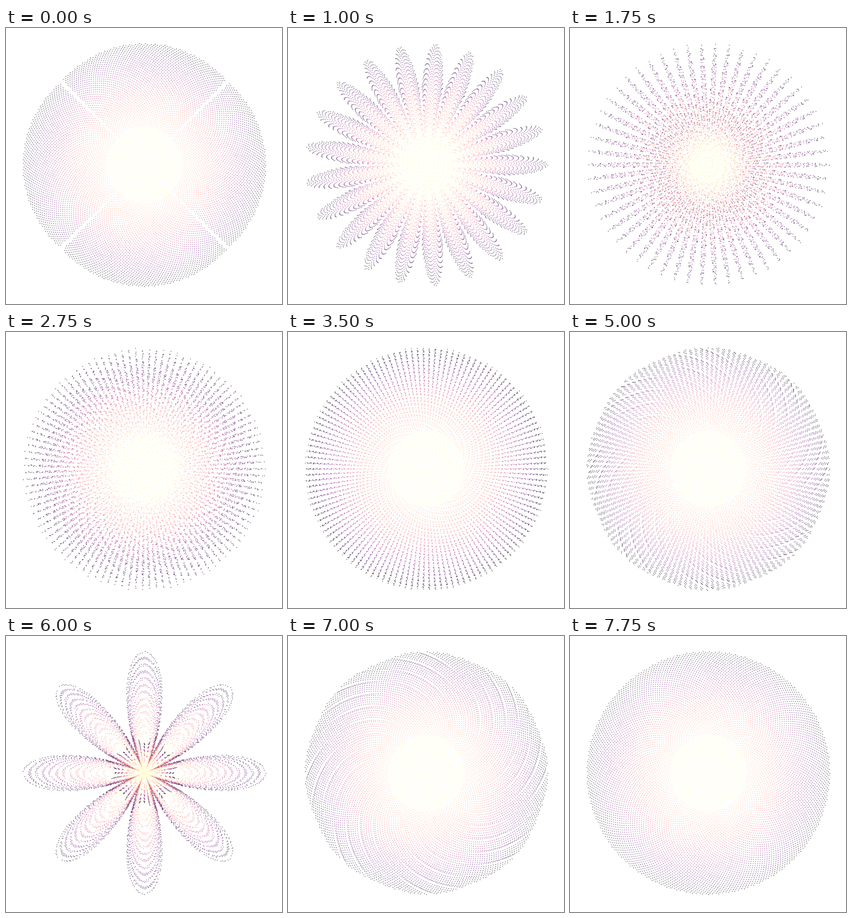
Write an HTML page with a canvas that moves like this. It is 480 px wide and 480 px high and loops after 8000 ms.

```html
<!DOCTYPE html>
<html lang="en">
<head>
<meta charset="utf-8">
<title>Phyllotaxis</title>
<style>
  html, body { margin: 0; width: 100%; height: 100%; overflow: hidden; background: #fff; }
  canvas { display: block; }
</style>
</head>
<body>
<canvas id="stage" width="480" height="480"></canvas>
<script>
const ctx = document.getElementById('stage').getContext('2d');
const COUNT = 10000, RADIUS = 211.5, CX = 240.7, CY = 238.2;
const STEP = 250, STEPS = 32;
const TURN = 2 * Math.PI, GOLDEN = Math.PI * (3 - Math.sqrt(5));
const PETALS = 8, SPIKES = 40, RING = RADIUS / 18;

const mix = (a, b, t) => a + (b - a) * t;
const snap = (value, unit) => Math.round(value / unit) * unit;
const bump = (x, center, width) => Math.exp(-(((x - center) / width) ** 2));

// Pale yellow through orange, pink and purple to black
function colorAt(u) {
  const r = 255 * Math.min(1, 1.43 * (1 - u));
  const g = 253 * (1 - u) ** 2;
  const b = 125 * Math.min(1, 4 * (1 - u)) + 66 * Math.max(0, 1 - 4 * u);
  return `rgb(${[r, g, b].map(Math.round)})`;
}

// Outermost first, so that the pale core lies on top
const points = Array.from({ length: COUNT }, (_, n) => {
  const i = COUNT - 1 - n, u = (i + 0.5) / COUNT, pale = u < 0.1;
  return {
    angle: i * GOLDEN,
    radius: RADIUS * Math.sqrt(u),
    color: colorAt(pale ? 0 : u),
    alpha: pale ? 0.3 : 0.6,
    size: pale ? 1.2 : 0.8,
    floret: i % 6 === 0
  };
});

// The sunflower gathers into ever more rays, then opens as a flower
function shapeAt(step) {
  return {
    rays: Math.round(136 / (1 + Math.exp(-0.43 * (step - 8)))),
    depth: 0.62 * bump(step, 7, 4),
    pull: 0.78 * bump(step, 15, 8),
    bloom: bump(step, 24, 2)
  };
}

function place(p, { rays, depth, pull, bloom }) {
  const lobe = Math.abs(Math.cos(p.angle * PETALS / 2));
  const ray = Math.abs(Math.cos(p.angle * rays / 2));
  const petal = p.floret ? 0.36 - 0.12 * lobe : 0.1 + 0.9 * lobe;
  const radius = mix(p.radius, snap(p.radius, RING), 0.6 * bloom);
  let angle = mix(p.angle, snap(p.angle, TURN / rays), pull * (1 - bloom));
  if (p.floret) angle = mix(angle, snap(angle, TURN / SPIKES), 0.8 * bloom);
  return [radius * mix(1, ray, depth) * mix(1, petal, bloom), angle];
}

function draw(step) {
  const shape = shapeAt(step);
  ctx.globalAlpha = 1;
  ctx.fillStyle = '#fff';
  ctx.fillRect(0, 0, 480, 480);
  for (const p of points) {
    const [r, angle] = place(p, shape);
    ctx.globalAlpha = p.alpha;
    ctx.fillStyle = p.color;
    ctx.beginPath();
    ctx.arc(CX + r * Math.cos(angle), CY - r * Math.sin(angle), p.size, 0, TURN);
    ctx.fill();
  }
}

let shown = -1;
function tick() {
  const step = Math.floor(performance.now() / STEP) % STEPS;
  if (step !== shown) draw(shown = step);
  requestAnimationFrame(tick);
}
tick();
</script>
</body>
</html>
```
